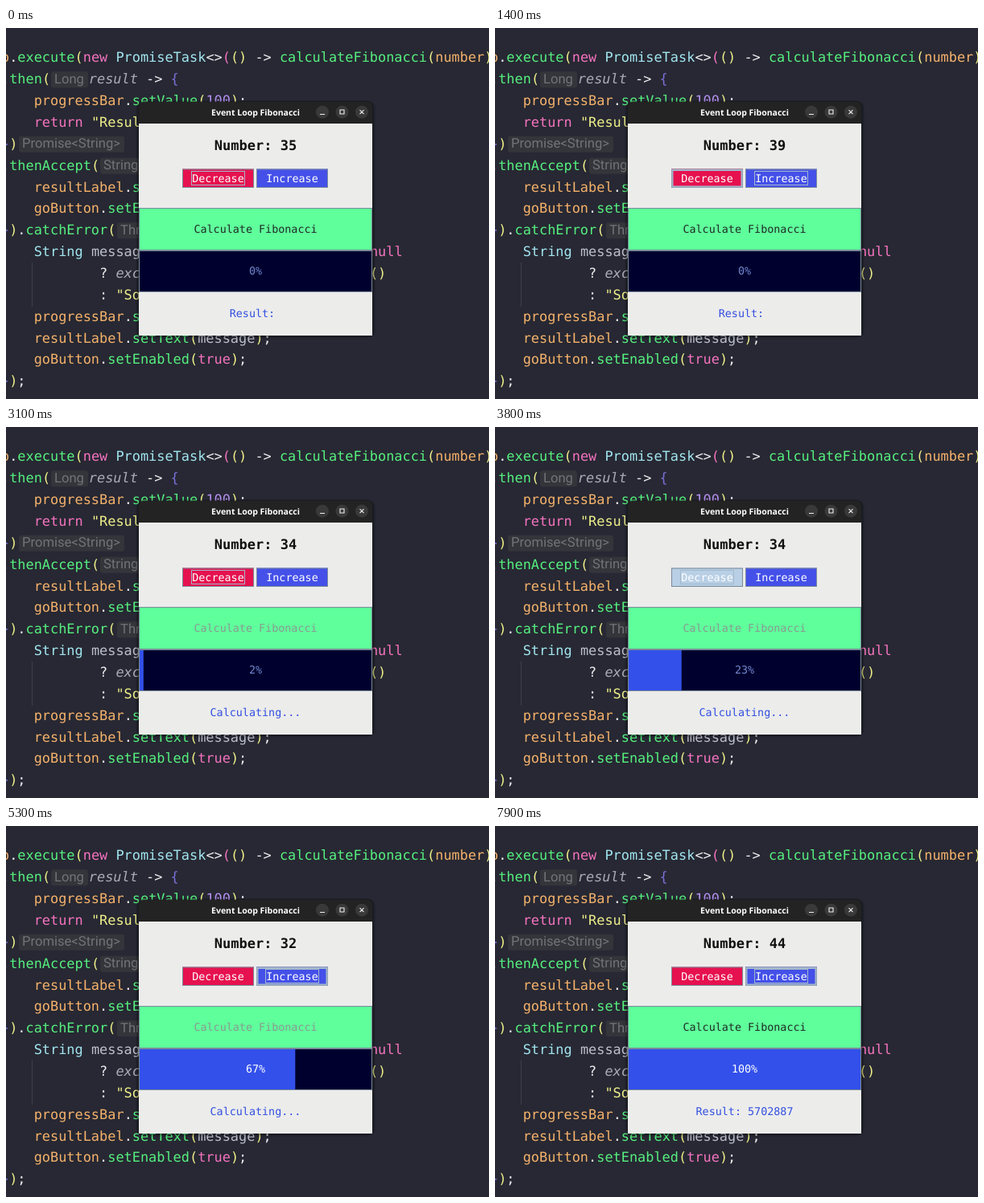
Animation, 600 px wide and 462 px high, one loop 8 s. Source, as an HTML page:

```html
<!DOCTYPE html>
<html lang="en">
<head>
<meta charset="utf-8">
<title>Event Loop Fibonacci</title>
<style>
html, body { margin: 0; width: 100%; height: 100%; overflow: hidden; background: #272833; }
svg { display: block; width: 600px; height: 462px; }
text { white-space: pre; text-rendering: geometricPrecision; }
.code, .ui { font-family: "DejaVu Sans Mono", monospace; }
.code { font-size: 16.9px; }
.ui { font-size: 13.4px; text-anchor: middle; }
.hint { font: 16.6px Roboto, sans-serif; fill: #727377; }
.title { font: bold 10.5px "Open Sans", sans-serif; fill: #fff; text-anchor: middle; }
.number { font-size: 17px; font-weight: bold; fill: #111; }
</style>
</head>
<body>
<svg id="stage" viewBox="0 0 600 462" xmlns="http://www.w3.org/2000/svg"></svg>
<script>
const LOOP = 8000, STEP = 100;
const stage = document.getElementById('stage');

function add(tag, attrs, text) {
  const el = document.createElementNS('http://www.w3.org/2000/svg', tag);
  for (const k in attrs) el.setAttribute(k, attrs[k]);
  if (text !== undefined) el.textContent = text;
  stage.appendChild(el);
  return el;
}
const rect = (x, y, width, height, fill, more) => add('rect', { x, y, width, height, fill, ...more });
const frame = (x, y, w, h, stroke, sw = 1) =>
  rect(x + sw / 2, y + sw / 2, w - sw, h - sw, 'none', { stroke, 'stroke-width': sw });
const label = (x, y, text, fill, cls = 'ui') => add('text', { x, y, fill, class: cls }, text);

// Editor behind the window
const CELL = 10.175, LEFT = -6, BASE = 42.3, LEAD = 26.87;
const INK = {
  g: '#56f07f', p: '#f573bf', o: '#f5b26b', c: '#a2e6f0', y: '#eff08a',
  v: '#b490ef', b: '#7a70d8', w: '#eeeef0', m: '#bcbfca', i: '#aaacb5'
};
// row, first x, then ink and text by turns
const code = [
  [0, 0, 'o', 'o', 'w', '.', 'g', 'execute', 'y', '(', 'p', 'new ', 'c', 'PromiseTask', 'w', '<>', 'p', '(', 'y', '()',
    'w', ' -> ', 'g', 'calculateFibonacci', 'y', '(', 'o', 'number', 'y', ')'],
  [1, 0, 'w', '.', 'g', 'then', 'y', '('],
  [1, 10.7, 'i', 'result', 'w', ' -> ', 'b', '{'],
  [2, 4, 'o', 'progressBar', 'w', '.', 'g', 'setValue', 'y', '(', 'v', '100', 'y', ')', 'w', ';'],
  [3, 4, 'p', 'return ', 'y', '"Result'],
  [4, 0, 'b', '}', 'y', ')'],
  [5, 0, 'w', '.', 'g', 'thenAccept', 'y', '('],
  [6, 4, 'o', 'resultLabel', 'w', '.', 'g', 's'],
  [7, 4, 'o', 'goButton', 'w', '.', 'g', 'setE'],
  [8, 0, 'b', '}', 'y', ')', 'w', '.', 'g', 'catchError', 'y', '('],
  [9, 4, 'c', 'String ', 'm', 'message'],
  [9, 45, 'p', 'null'],
  [10, 12, 'w', '? ', 'i', 'exc'],
  [10, 45, 'y', '()'],
  [11, 12, 'w', ': ', 'y', '"So'],
  [12, 4, 'o', 'progressBar', 'w', '.', 'g', 's'],
  [13, 4, 'o', 'resultLabel', 'w', '.', 'g', 'setText', 'y', '(', 'm', 'message', 'y', ')', 'w', ';'],
  [14, 4, 'o', 'goButton', 'w', '.', 'g', 'setEnabled', 'y', '(', 'p', 'true', 'y', ')', 'w', ';'],
  [15, 0, 'b', '}', 'y', ')', 'w', ';']
];
const hints = [[1, 56, 46, 'Long'], [4, 16, 131, 'Promise<String>'], [5, 117, 60, 'String'], [8, 138, 60, 'Throwable']];

rect(0, 0, 600, 462, '#272833');
rect(32, 292, 1, 55, '#3d3f4a');
for (const [row, x, w, text] of hints) {
  const y = BASE + row * LEAD;
  rect(x, y - 15, w, 20, '#34353a', { rx: 3 });
  label(x + 4, y - 0.3, text, '#727377', 'hint');
}
for (const [row, start, ...parts] of code) {
  let col = start;
  for (let i = 0; i < parts.length; i += 2) {
    const el = label(LEFT + col * CELL, BASE + row * LEAD, parts[i + 1], INK[parts[i]], 'code');
    if (parts[i] === 'i') el.setAttribute('font-style', 'italic');
    col += parts[i + 1].length;
  }
}

// Window
const GREY = '#7a8a99', PALE = '#b8cfe5', BLUE = '#3350ea';
for (let i = 4; i > 0; i--) rect(165 - i, 92 - i / 2, 290 + 2 * i, 291 + 1.5 * i, '#000', { rx: 6 + i, opacity: 0.1 });
rect(165, 92, 290, 40, '#232323', { rx: 6 });
rect(165, 119, 290, 264, '#ececeb');
label(310, 109, 'Event Loop Fibonacci', '#fff', 'title');
for (const cx of [393, 417.5, 442]) add('circle', { cx, cy: 104.7, r: 8, fill: '#393939' });
add('path', {
  d: 'M390 107.5h6M415 102h5v5h-5zM439.5 102.2l5 5m0-5l-5 5',
  stroke: '#f0f0f0', 'stroke-width': 1.1, fill: 'none'
});
const numberText = label(310, 152, '', '#111', 'ui number');

function button(x, y, w, h, color, ink, text, base, edge) {
  const face = rect(x, y, w, h, color);
  frame(x, y, w, h, edge);
  const glow = frame(x + 0.5, y + 0.5, w - 1, h - 1, '#a3b8cc', 2);
  const tw = text.length * 8.07;
  const ring = frame(Math.round(x + w / 2 - tw / 2) - 1, base - 13.5, Math.round(tw) + 2, 18, '#a3b8cc');
  const cap = label(x + w / 2, base, text, ink);
  const show = (el, on) => el.setAttribute('visibility', on ? 'visible' : 'hidden');
  return (hover, down, focus, off) => {
    face.setAttribute('fill', down ? PALE : color);
    show(glow, hover && !down && !off);
    show(ring, focus && !off);
    cap.setAttribute('fill', off ? '#8a9a90' : ink);
  };
}
const buttons = {
  D: button(219, 175.5, 89, 23.5, '#e6114f', '#fff', 'Decrease', 191.5, GREY),
  I: button(311, 175.5, 89, 23.5, '#4450e8', '#fff', 'Increase', 191.5, GREY),
  C: button(165, 224, 290, 53, '#5fff9c', '#1f2a24', 'Calculate Fibonacci', 254.7, GREY)
};

// Progress bar: caption turns white where the fill covers it
rect(165, 277, 290, 52, '#00002e');
const darkCap = label(310, 307, '', '#7288cf');
const fill = rect(165, 277, 0, 52, BLUE);
const clip = add('clipPath', { id: 'filled' });
const clipBox = rect(165, 277, 0, 52, '#fff');
clip.appendChild(clipBox);
const lightCap = label(310, 307, '', '#fff');
lightCap.setAttribute('clip-path', 'url(#filled)');
frame(165, 277, 290, 52, GREY);
const resultText = label(310, 360, '', '#3350e0');

// Timeline
const START = 3000, DONE = 6300, RATE = 0.0292;
const hovers = [[0, ''], [300, 'I'], [1400, 'D'], [2400, ''], [2500, 'C'], [3200, ''], [3700, 'D'], [4700, ''], [4800, 'I']];
const focuses = [[0, 'D'], [500, 'I'], [1600, 'D'], [2800, 'C'], [3000, 'D'], [4900, 'I']];
const presses = [500, 700, 900, 1100, 1600, 1800, 2100, 2800, 2900, 3800, 4000, 4300, 4500,
  4900, 5100, 5400, 5700, 6000, 6300, 6600, 6800, 7700];
const ups = [600, 800, 1000, 1200, 5000, 5200, 5500, 5600, 5800, 5900, 6100, 6200, 6400, 6500, 6700, 6900, 7300, 7800];
const downs = [1700, 1900, 2000, 2200, 2300, 3900, 4100, 4400, 4600];

const at = (table, t) => table.filter(s => s[0] <= t).pop()[1];
const count = (list, t) => list.filter(s => s <= t).length;

function render(now) {
  const t = Math.floor(now % LOOP / STEP) * STEP;
  const busy = t >= START && t < DONE;
  const hover = at(hovers, t), focus = at(focuses, t), down = presses.includes(t);
  for (const k in buttons) buttons[k](hover === k, down && hover === k, focus === k, k === 'C' && busy);

  numberText.textContent = 'Number: ' + (35 + count(ups, t) - count(downs, t));
  const pct = t < START ? 0 : t >= DONE ? 100 : Math.floor((t - START) * RATE);
  darkCap.textContent = lightCap.textContent = pct + '%';
  for (const el of [fill, clipBox]) el.setAttribute('width', pct * 2.9);
  resultText.textContent = busy ? 'Calculating...' : t < START ? 'Result: ' : 'Result: 5702887';
}

const t0 = performance.now();
function tick() {
  render(performance.now() - t0);
  requestAnimationFrame(tick);
}
tick();
</script>
</body>
</html>
```
